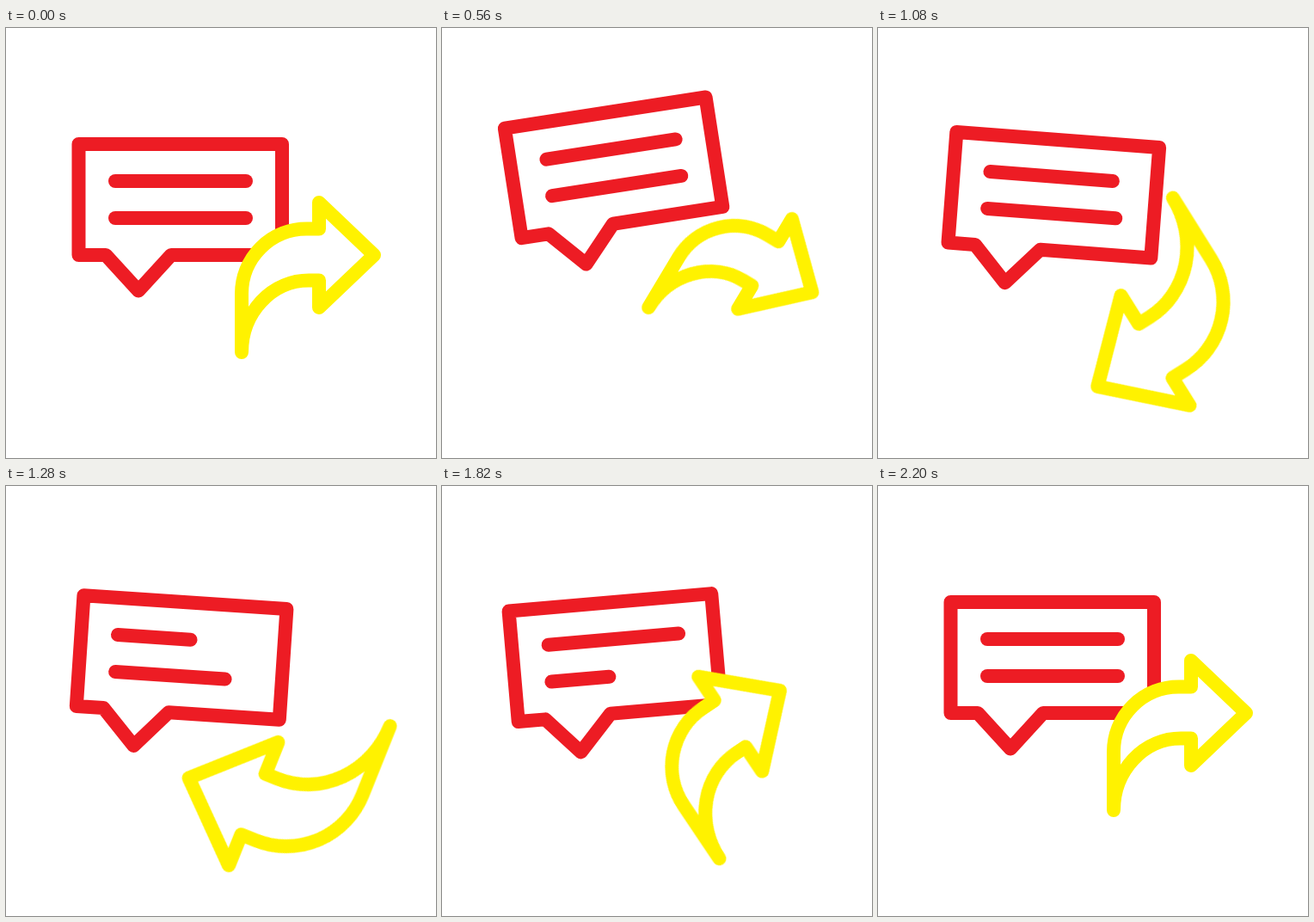
These frames come from a looping animation (500x500 px, 2400 ms). An HTML page without scripts:

```html
<!DOCTYPE html>
<html lang="en">
<head>
<meta charset="utf-8">
<title>Share message</title>
<style>
  html, body { margin: 0; width: 100%; height: 100%; overflow: hidden; background: #fff; }
  svg { display: block; width: 500px; height: 500px; }

  path, line { stroke-width: 16; stroke-linecap: round; stroke-linejoin: round; }
  .bubble { stroke: #ed1c24; fill: none; transform-origin: 203px 220px; }
  .arrow { stroke: #fff200; fill: #fff; transform-origin: 351px 290px; vector-effect: non-scaling-stroke; }
  .zoom { transform-origin: 486px 82px; }
  line { stroke-dasharray: 152 400; }

  .bubble, .arrow, .zoom, line {
    animation: 2.4s cubic-bezier(.3333, 0, .6667, 1) infinite;
  }
  .bubble { animation-name: lift, rock; }
  .arrow { animation-name: spin; }
  .zoom { animation-name: grow; }
  .first { animation-name: shrink-first; }
  .second { animation-name: shrink-second; }

  @keyframes lift {
    0%, 8.3333% { translate: 0 0; }
    27.5% { translate: 0 -42.5px; }
    50%, 100% { translate: 0 0; }
  }
  @keyframes rock {
    0%, 8.3333% { rotate: 0deg; }
    27.5% { rotate: -10deg; }
    47.5% { rotate: 5deg; }
    75% { rotate: -5deg; }
    91.6667%, 100% { rotate: 0deg; }
  }
  @keyframes spin {
    0%, 8.3333% { transform: rotate(0deg); }
    91.6667%, 100% { transform: rotate(360deg); }
  }
  @keyframes grow {
    0%, 27.5% { transform: scale(1); }
    50% { transform: scale(1.27); }
    91.6667%, 100% { transform: scale(1); }
  }
  @keyframes shrink-first {
    0%, 41.6667% { stroke-dashoffset: 0; }
    58.3333% { stroke-dashoffset: 85.4px; }
    75%, 100% { stroke-dashoffset: 0; }
  }
  @keyframes shrink-second {
    0%, 41.6667% { stroke-dashoffset: 0; }
    75% { stroke-dashoffset: 85.4px; }
    91.6667%, 100% { stroke-dashoffset: 0; }
  }
</style>
</head>
<body>
<svg viewBox="0 0 500 500">
  <g class="bubble">
    <path d="M84.5 135H321V264H192L154 305.5L116 264H84.5Z"/>
    <line class="first" x1="127" y1="178" x2="279" y2="178"/>
    <line class="second" x1="127" y1="221" x2="279" y2="221"/>
  </g>
  <g class="zoom">
    <path class="arrow" d="M274 377V309A75.5 75.5 0 0 1 349.5 233.5H364V203L428 264L364 325V293.5H352A78 83.5 0 0 0 274 377Z"/>
  </g>
</svg>
</body>
</html>
```
